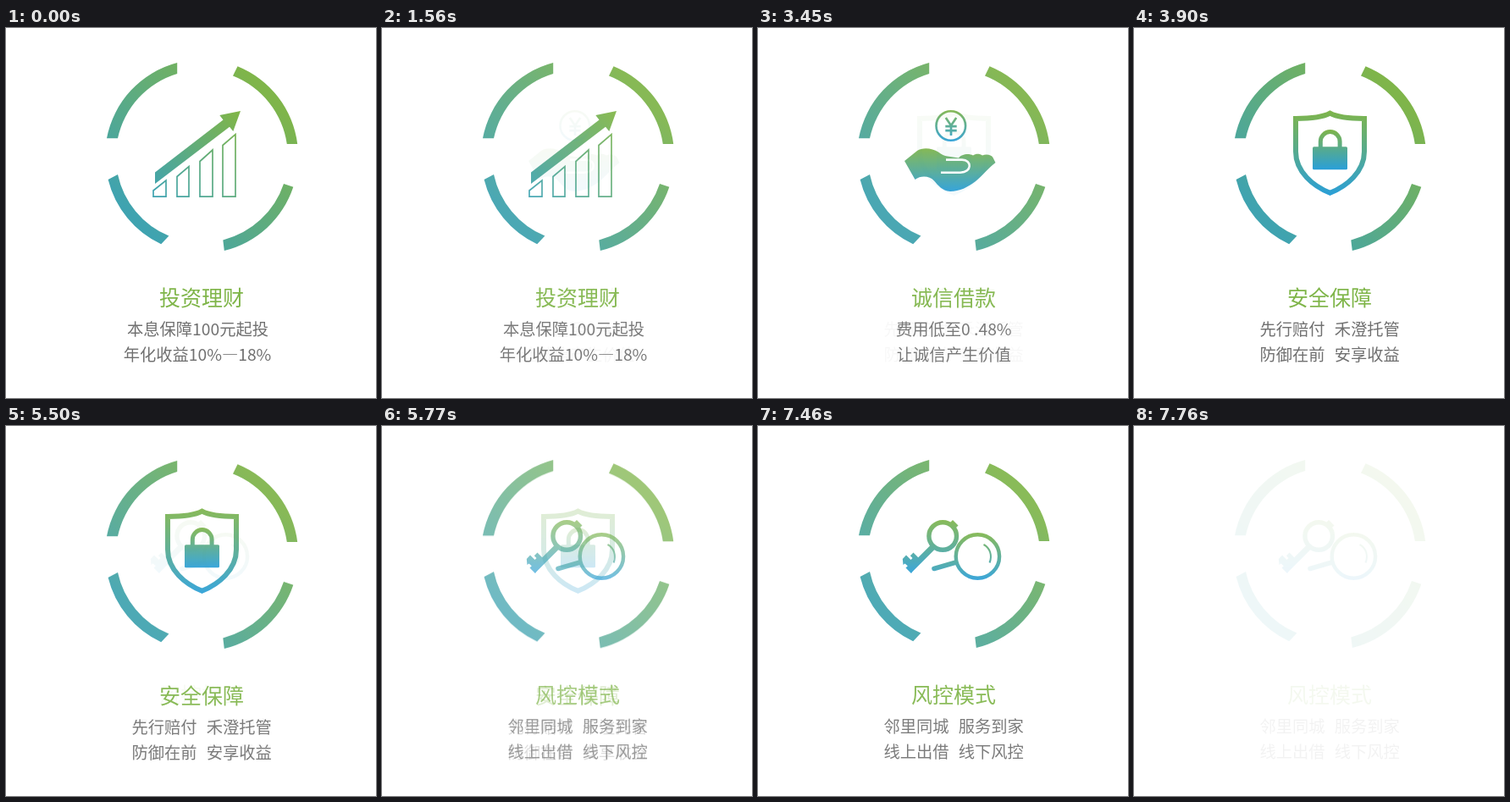
Recreate the animation shown at these times as an HTML page. Size 437 by 437 pixels, loop 7.86 s.

```html
<!DOCTYPE html>
<html lang="zh-CN">
<head>
<meta charset="utf-8">
<style>
html, body { margin: 0; width: 100%; height: 100%; overflow: hidden; background: #fff; }
svg { display: block; width: 100vw; height: 100vh; }
text { font-family: "Noto Sans CJK SC", "Noto Sans CJK", "Noto Sans", sans-serif; text-anchor: middle; white-space: pre; }
.title { font-size: 25px; font-weight: 300; fill: #7fb549; }
.body { font-size: 19.3px; fill: #707070; }
.line { fill: none; }
</style>
</head>
<body>
<svg viewBox="0 0 437 437">
  <defs id="defs"></defs>
  <g id="ring" style="display:none"></g>
  <g id="scenes"></g>
</svg>
<script>
const LOOP = 7860, STEP = 30;
const GREEN = '#7fb54a', BLUE = '#2a9fd8', TEAL = '#3fa3b0';

const gradient = (id, x1, y1, x2, y2, from, to) =>
  `<linearGradient id="${id}" gradientUnits="userSpaceOnUse" x1="${x1}" y1="${y1}" x2="${x2}" y2="${y2}">
    <stop stop-color="${from}"/><stop offset="1" stop-color="${to}"/></linearGradient>`;
const vertical = (id, top, bottom) => gradient(id, 0, top, 0, bottom, GREEN, BLUE);

const fill = (id, d) => `<path fill="url(#${id})" d="${d}"/>`;
const line = (id, width, d, extra = '') =>
  `<path class="line" stroke="url(#${id})" stroke-width="${width}" d="${d}" ${extra}/>`;
const circle = (id, width, x, y, r) =>
  `<circle class="line" stroke="url(#${id})" stroke-width="${width}" cx="${x}" cy="${y}" r="${r}"/>`;
const text = (cls, x, y, str) => `<text class="${cls}" x="${x}" y="${y}">${str}</text>`;

document.getElementById('defs').innerHTML =
  gradient('ringFill', 156.5, 226.7, 306.5, 76.7, TEAL, GREEN) +
  gradient('chart', 177.5, 197.5, 272.5, 102.5, TEAL, GREEN) +
  vertical('coin', 97, 134) + vertical('hand', 142, 193) +
  vertical('shield', 97, 198) + vertical('lock', 120, 167) +
  vertical('key', 112, 175) + vertical('lens', 127, 183);

// Each arc: outer start, outer end, inner end, inner start.
const ring = [
  ['119,130.3', '202.2,41', '202.2,54', '132,130.3'],
  ['273.5,45.2', '344.2,137', '331.8,137', '268,56.6'],
  ['339.3,187.8', '257.8,263', '256.3,250.4', '328,184'],
  ['183.2,255.2', '120.6,179', '132,173', '192.4,245.6'],
].map(([a, b, c, d]) =>
  fill('ringFill', `M${a}A114.2,114.2 0 0 1 ${b}L${c}A101.8,101.8 0 0 0 ${d}Z`)).join('');

const bars = [[174, 189, 192, 180], [202, 216, 175.5, 163.5], [229, 244, 157.5, 144], [256, 271, 138.5, 125.5]]
  .map(([l, r, yl, yr]) => line('chart', 1.7, `M${l},199.2V${yl}L${r},${yr}V199.2Z`)).join('');

const chartIcon = bars +
  fill('chart', 'M176,170.5L256.5,108.5L252.3,103L277,98L268.3,122L264,116.8L176,184Z');

const handIcon = circle('coin', 2.6, 227.8, 115.5, 17.3) +
  line('coin', 2.7, 'M221.8,106L228,115.2L234.2,106M228,114.5V127M221.3,116.2H234.7M221.3,121.2H234.7') +
  fill('hand', `M173,157L188,145C194,140.5 206,141.5 213,146.5C217,149.5 220,151 224,151.5L237,153.5
    C240,149 249,147.5 254,150.5C257,148 262,148 265,150.5C269,148.5 276,149.5 277.5,153L280.5,159
    C271,166 266,174 257,181C248,188 238,193 227,193C217,192 213,186 208,180.5C203,175 193,173.5 185.5,179Z`) +
  `<path class="line" stroke="#fff" stroke-width="2.6" d="M216,170.7H239C253,170.7 253,155.6 241,155.6H222"/>`;

const shieldIcon =
  line('shield', 6, `M231.5,100.7C222,106 206,107 191,107V146C191,170 212,187 231.5,194.7
    C251,187 272,170 272,146V107C257,107 241,106 231.5,100.7Z`) +
  line('lock', 5, 'M220.3,142V134A11.4,11.4 0 0 1 243.1,134V142') +
  '<rect fill="url(#lock)" x="211" y="140.3" width="41" height="27" rx="1.5"/>';

const searchIcon = circle('key', 5.4, 218.2, 131, 16.3) +
  line('key', 7, 'M207,143.5L178.5,172') +
  fill('key', `M170.8,158L175,153.5L180.5,159L182.5,157L179.8,154.2L183.5,150.5L191,158L181,175L174.5,168.5
    L176.8,166.3L173.5,163.5L171.5,165Z`) +
  fill('key', 'M226.5,115.5L230,112L236.5,118.5L233,122Z') +
  circle('lens', 4.4, 259.4, 155, 25.7) +
  line('lens', 5.6, 'M208,169.5L233,162.3', 'stroke-linecap="round"') +
  line('lens', 2, 'M266.5,141C274,145 277,154 273.5,162.5');

const scenes = [
  { icon: chartIcon, title: '投资理财', body: [[226.5, 0, '本息保障100元起投'], [226, 1, '年化收益10%—18%']] },
  { icon: handIcon, title: '诚信借款', body: [[231.3, 0, '费用低至0 .48%'], [231.3, 1, '让诚信产生价值']] },
  { icon: shieldIcon, title: '安全保障',
    body: [[187, 0, '先行赔付'], [275.3, 0, '禾澄托管'], [187, 1, '防御在前'], [275.3, 1, '安享收益']] },
  { icon: searchIcon, title: '风控模式', shift: -1,
    body: [[187, 0, '邻里同城'], [275.3, 0, '服务到家'], [187, 1, '线上出借'], [275.3, 1, '线下风控']] },
];

const stage = document.getElementById('scenes');
stage.innerHTML = scenes.map(({ icon, title, body, shift = 0 }) =>
  `<g transform="translate(0 ${shift})">${ring}${icon}${text('title', 231, 328, title)}${
    body.map(([x, row, str]) => text('body', x, 363.3 + 30 * row, str)).join('')}</g>`).join('');
const layers = [...stage.children];

// Start time and number of steps of each fade; the last one fades to white.
const fades = [[1560, 14], [3450, 16], [5500, 13], [7460, 12]];

const progress = (t, [start, steps]) =>
  t < start ? 0 : Math.min(1, (Math.floor((t - start) / STEP) + 1) / steps);
const rise = p => p * (0.75 + 0.25 * p ** 3);

function draw(now) {
  const t = now % LOOP;
  const p = fades.map(f => progress(t, f));
  p[3] = Math.min(p[3], 11 / 12);
  layers.forEach((layer, i) => {
    const alpha = (i ? rise(p[i - 1]) : 1) * (1 - p[i]);
    layer.style.opacity = alpha;
    layer.style.display = alpha ? '' : 'none';
  });
}

const begin = performance.now();
function tick() {
  draw(performance.now() - begin);
  requestAnimationFrame(tick);
}
tick();
</script>
</body>
</html>
```
